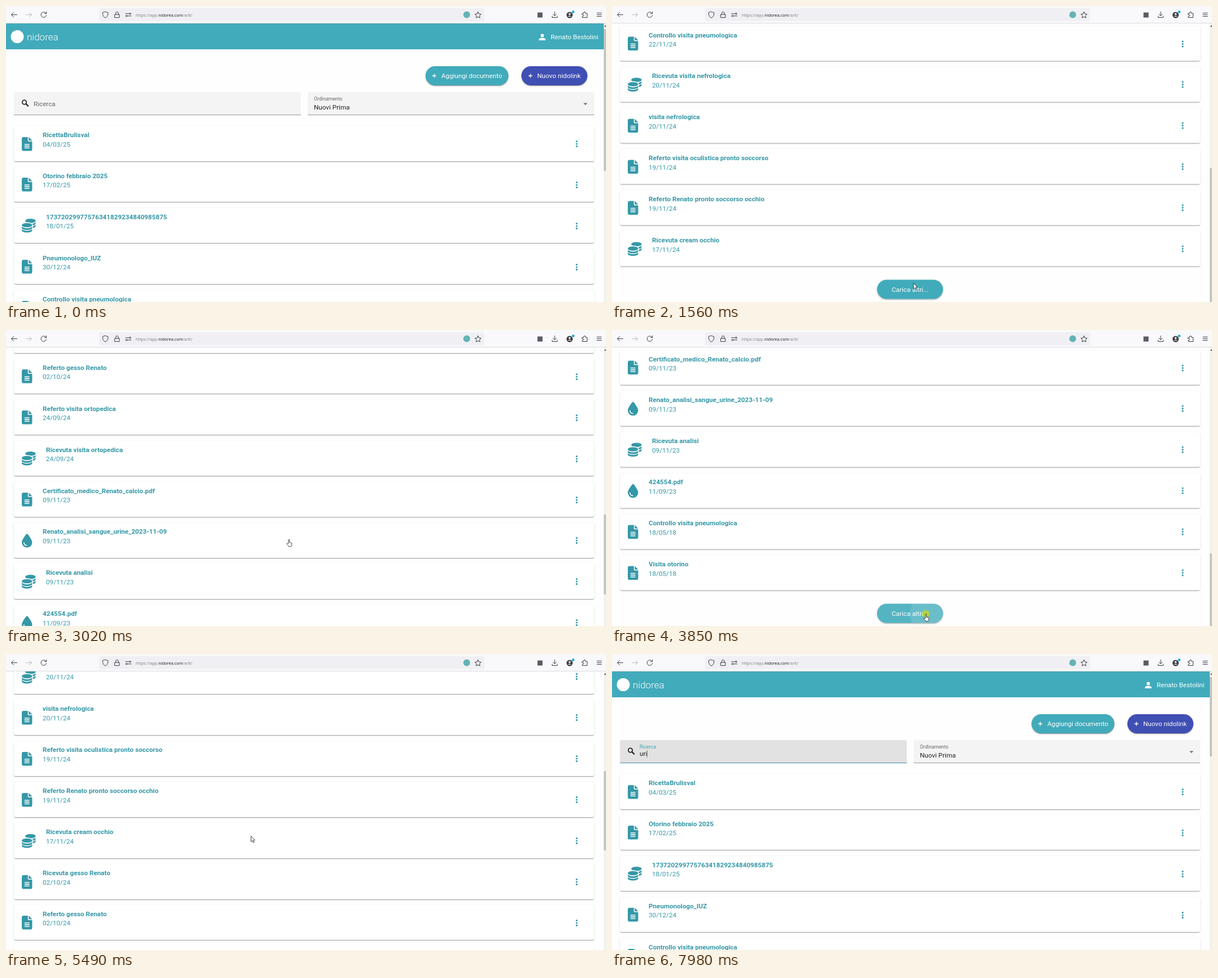
Animation, 1064 px wide and 526 px high, one loop 8000 ms. Source, as an HTML page:

```html
<!DOCTYPE html>
<html lang="it">
<head>
<meta charset="utf-8">
<title>Documenti</title>
<style>
html, body { margin: 0; width: 100%; height: 100%; overflow: hidden; background: #fefefe; }
body { position: relative; font: 11.7px/16px Roboto, sans-serif; color: #222; }
div, svg, span { position: absolute; }
span { white-space: pre; }
svg { overflow: visible; }
#page { left: 0; top: 0; width: 1060px; height: 526px; }
#head { left: 0; top: 30px; width: 1060px; height: 47px; background: #41abbb; }
.white { color: #fff; }
.brand { font-size: 17px; font-weight: 300; }
.small { font-size: 8.75px; }
.grey { color: #666; }
.card { left: 14px; width: 1029px; height: 62.3px; border-radius: 3px; background: #fff; color: #3598a7;
  box-shadow: 0 2px 1px -1px rgba(0,0,0,.2), 0 1px 1px rgba(0,0,0,.14), 0 1px 3px rgba(0,0,0,.12); }
.card svg { fill: #3598a7; }
.title { font-weight: 700; }
.pill { height: 34px; border-radius: 17px; background: #41abbb; overflow: hidden; }
.lift { height: 34px; border-radius: 17px;
  box-shadow: 0 2px 1px -1px rgba(0,0,0,.2), 0 1px 1.5px rgba(0,0,0,.18), 0 1px 4px rgba(0,0,0,.14); }
.field { top: 153px; width: 508.5px; height: 40px; background: #f4f4f4; border-radius: 3px 3px 0 0; border-bottom: 1px solid #959595; }
#focus { left: 14px; top: 193px; width: 508.5px; height: 1px; background: #3f8fa8; }
#label { transform-origin: 0 50%; }
#caret { width: 1px; height: 13px; top: 171px; background: #41abbb; }
#ripple { width: 2px; height: 2px; border-radius: 50%; background: #fff; }
#hover { inset: 0; background: #fff; }
#track { left: 1060px; top: 30px; width: 4px; height: 496px; background: #f1f1f1; }
#thumb { left: 1060px; width: 4px; background: #c3c4c5; }
#chrome { left: 0; top: 0; width: 1064px; height: 30px; background: #f9f9fb; border-bottom: 1px solid #dcdce0; }
.bar { left: 165px; top: 4px; width: 683px; height: 23px; border-radius: 3px; background: #f0f0f4; }
.url { font: 7.4px/16px "Open Sans", sans-serif; color: #7b7b82; }
.url b { font-weight: 400; color: #15141a; }
#dot { width: 13px; height: 13px; border-radius: 50%; background: rgba(184,212,48,.88); }
</style>
</head>
<body>
<div id="page"></div>
<div id="track"></div>
<div id="thumb"></div>
<div id="chrome">
  <div class="bar"></div>
  <svg width="1064" height="30" fill="none" stroke="#3c3c44" stroke-linecap="round" stroke-linejoin="round">
    <path d="M19.500 15.500H9.500M13.500 11.500l-4 4 4 4"/>
    <path stroke="#b9b9bf" d="M35.500 15.500H45.500M41.500 11.500l4 4-4 4"/>
    <path d="M71 13a4.800 4.800 0 1 0 .6 3.500M71.600 10.200v3.200h-3.200"/>
    <path d="M176.200 10.200l4.800 1.700c.3 4.500-1.300 7.600-4.800 9.300-3.500-1.700-5.100-4.800-4.800-9.300z"/>
    <path d="M193 15h8v5.500h-8zM194.700 15v-2.200a2.300 2.300 0 0 1 4.600 0V15"/>
    <path d="M212 13.700h6M213.500 17.700h8.500"/>
    <circle cx="220" cy="13.700" r="1.300"/><circle cx="213.500" cy="17.700" r="1.300" fill="#f0f0f4"/>
    <path d="M837 10.500l1.700 3.500 3.800.5-2.800 2.700.7 3.800-3.400-1.800-3.400 1.800.7-3.800-2.800-2.700 3.800-.5z"/>
    <path d="M973 10.500v6.500M970 14.500l3 3 3-3M968.500 18v2.500h9V18"/>
    <path d="M1022 13h2.500v-1a1.500 1.500 0 0 1 3 0v1h3v7.500h-8.500v-2.500h1.200a1.300 1.300 0 0 0 0-2.600H1022z"/>
    <path d="M1048 12.500h8M1048 15.500h8M1048 18.500h8"/>
    <g stroke="none">
      <circle cx="817" cy="15.500" r="6" fill="#63b3b5"/>
      <rect x="942.500" y="11.500" width="9" height="9" fill="#5b5b66"/>
      <circle cx="999.500" cy="16" r="5.500" fill="#3c3c44"/>
      <circle cx="999.500" cy="14.300" r="1.800" fill="#fff"/>
      <path d="M996.300 18.800a3.300 2 0 0 1 6.400 0z" fill="#fff"/>
      <circle cx="1005.800" cy="10.500" r="2.300" fill="#12a5d8"/>
    </g>
  </svg>
  <span class="url" style="left:230px;top:8px">https://app.<b>nidorea.com</b>/a/it/</span>
</div>
<svg width="4" height="4" style="left:1060px;top:33px"><path d="M0.500 4L3 1l2.500 3z" fill="#666"/></svg>
<div id="dot"></div>
<svg id="cursor" width="12" height="14" fill="#fff" stroke="#222" stroke-width=".85" stroke-linejoin="round">
  <path id="arrow" d="M0 0v10.200l2.300-2 1.700 3.500 1.500-.7-1.600-3.400 3.100-.3z"/>
  <path id="hand" d="M-1 7.500V1.200a1 1 0 0 1 2 0v4.300l3.200.7c.8.2 1.200.7 1.100 1.500l-.4 2.700c-.1.900-.5 1.700-.8 2.400H0C-.9 11.400-2.400 9.700-3.500 8.500c-.7-.9.5-1.800 1.300-1.100z"/>
  <path id="beam" fill="none" d="M-2-6q2 0 2 1.200 0-1.200 2-1.200M0-5V5M-2 6q2 0 2-1.200 0 1.200 2 1.200"/>
</svg>
<script>
const $ = id => document.getElementById(id);
const LOOP = 8000, STEP = 70.2, FIRST = 122, ROW = 72.9, TOP = 213.3;

// icon, title, date
const docs = [
  ['file', 'RicettaBrulisval', '04/03/25'],
  ['file', 'Otorino febbraio 2025', '17/02/25'],
  ['coins', '17372029977576341829234840985875', '18/01/25'],
  ['file', 'Pneumonologo_IUZ', '30/12/24'],
  ['file', 'Controllo visita pneumologica', '22/11/24'],
  ['coins', 'Ricevuta visita nefrologica', '20/11/24'],
  ['file', 'visita nefrologica', '20/11/24'],
  ['file', 'Referto visita oculistica pronto soccorso', '19/11/24'],
  ['file', 'Referto Renato pronto soccorso occhio', '19/11/24'],
  ['coins', 'Ricevuta cream occhio', '17/11/24'],
  ['file', 'Ricevuta gesso Renato', '02/10/24'],
  ['file', 'Referto gesso Renato', '02/10/24'],
  ['file', 'Referto visita ortopedica', '24/09/24'],
  ['coins', 'Ricevuta visita ortopedica', '24/09/24'],
  ['file', 'Certificato_medico_Renato_calcio.pdf', '09/11/23'],
  ['drop', 'Renato_analisi_sangue_urine_2023-11-09', '09/11/23'],
  ['coins', 'Ricevuta analisi', '09/11/23'],
  ['drop', '424554.pdf', '11/09/23'],
  ['file', 'Controllo visita pneumologica', '18/05/18'],
  ['file', 'Visita otorino', '18/05/18'],
  ['file', 'Visita allergologica', '11/04/18']
];

const band = 'M0 290c40 40 110 62 192 62s152-22 192-62v46c0 44-86 80-192 80S0 380 0 336z';
const icons = {
  file: `<path d="M64 0H224V128q0 32 32 32H384V448q0 64-64 64H64Q0 512 0 448V64Q0 0 64 0zM256 0L384 128H256z"/>
    <path d="M112 272H272M112 336H272M112 400H272" stroke="#fff" stroke-width="32" stroke-linecap="round"/>`,
  coins: `<ellipse cx="320" cy="80" rx="192" ry="80"/>
    <path d="${band}" transform="translate(128 -160)"/><path d="${band}" transform="translate(128 -64)"/>
    <path d="M0 240a192 80 0 0 1 384 0v192a192 80 0 0 1-384 0z" fill="#fff" stroke="#fff" stroke-width="56"/>
    <ellipse cx="192" cy="240" rx="192" ry="80"/><path d="${band}"/><path d="${band}" transform="translate(0 96)"/>`,
  drop: `<path d="M192 0C215 0 384 222 384 320a192 192 0 0 1-384 0C0 222 169 0 192 0z"/>
    <path d="M80 328q6 104 108 108" fill="none" stroke="#fff" stroke-width="32" stroke-linecap="round"/>`
};

const text = (x, y, str, cls = '', id = '') =>
  `<span id="${id}" class="${cls}" style="left:${x}px;top:${y - 8}px">${str}</span>`;
const box = (cls, x, y, w, extra = '') =>
  `<div class="${cls}" style="left:${x}px;top:${y}px;width:${w}px;${extra}"></div>`;
const plus = (x, y) => `<path d="M${x - 3.5} ${y}h7M${x} ${y - 3.5}v7" stroke="#fff" stroke-width="1.3"/>`;

function card([icon, title, date], i) {
  const x = icon === 'coins' ? 57 : 51;
  return `<div class="card" style="top:${TOP + ROW * i}px">
    <svg width="25" height="25" style="left:14px;top:19.300px"><g transform="scale(.048)">${icons[icon]}</g></svg>
    ${text(x, 15.7, title, 'title')}${text(x, 32.3, date)}
    <svg width="4" height="20" style="left:998px;top:31.700px">${[-4.4, 0, 4.4].map(y => `<circle cy="${y}" r="1.600"/>`).join('')}</svg>
  </div>`;
}

$('page').innerHTML = `
  <div id="head"></div>
  <svg width="1060" height="90" fill="#fff">
    <circle cx="20" cy="54.500" r="11.500"/>
    <circle cx="951" cy="52.500" r="2.900"/><path d="M945.200 61v-1.500c0-4 11.600-4 11.600 0V61z"/>
  </svg>
  ${text(37, 54.5, 'nidorea', 'white brand')}${text(966, 54.5, 'Renato Bestolini', 'white')}
  ${box('lift', 744, 107, 147, 'background:#41abbb')}${box('lift', 914, 107, 117, 'background:#3f4fb4')}
  ${text(772, 124, 'Aggiungi documento', 'white')}${text(942, 124, 'Nuovo nidolink', 'white')}
  <div class="field" id="search" style="left:14px"></div><div class="field" style="left:534.500px"></div>
  <div id="focus"></div>
  <svg width="1060" height="200" fill="none">
    ${plus(759.5, 124)}${plus(930, 124)}
    <circle cx="32.500" cy="171" r="3.700" stroke="#111" stroke-width="1.600"/>
    <path d="M35.200 173.700l4.600 4.600" stroke="#111" stroke-width="2"/>
    <path d="M1024 172.500h7l-3.500 3.500z" fill="#666"/>
  </svg>
  ${text(49, 174.2, 'Ricerca', 'grey', 'label')}${text(49, 177.4, '', '', 'typed')}<div id="caret"></div>
  ${text(546, 164.7, 'Ordinamento', 'small grey')}${text(546, 180, 'Nuovi Prima')}
  ${docs.map(card).join('')}
  <div id="more" class="lift" style="left:470px;width:117px">
    <div class="pill" style="width:117px"><div id="hover"></div><div id="ripple"></div>
    ${text(26, 17.2, 'Carica altri...', 'white')}</div>
  </div>`;

// keys are [step, values...]
const scrollKeys = [[-1, 0], [0, 18], [2, 110], [7, 400], [10, 469.5], [34, 469.5], [35, 495.5],
  [37, 620], [42, 1050], [45, 1198.5], [57, 1198.5], [58, 1170], [63, 880], [64, 870], [71, 870],
  [72, 835], [76, 569], [81, 110], [83, 0]];
const cursorKeys = [[0, 430, 254], [12, 430, 256], [20, 534.5, 492.5], [22, 538, 498], [25, 538, 498],
  [34, 473.5, 287.5], [36, 473.5, 288], [46, 530, 456], [51, 556.7, 504.7], [54, 556.7, 504.7], [64, 452, 310],
  [67, 452, 310], [71, 447, 326], [76, 434.5, 323.5], [83, 300, 252], [85, 253.7, 216.7], [90, 165, 177.5]];
const shapes = [[0, 'arrow'], [12, 'hand'], [19, 'arrow'], [21, 'hand'], [72, 'arrow'], [83, 'hand'], [88, 'beam']];
const typing = [[0, ''], [7580, 'u'], [7790, 'ur'], [7980, 'uri']];
const clicks = [23, 53, 90];
const bars = [[252, .526], [142, .2972], [141, .2935]];

const clamp = v => Math.max(0, Math.min(1, v));
const last = (keys, v) => keys.filter(k => k[0] <= v).pop() || keys[0];
const show = (el, on) => { el.style.display = on ? '' : 'none'; };

function mix(keys, n) {
  const a = last(keys, n), b = keys[keys.indexOf(a) + 1] || a;
  const p = a === b ? 0 : clamp((n - a[0]) / (b[0] - a[0]));
  return a.slice(1).map((v, i) => v + (b[i + 1] - v) * p);
}

const cards = [...document.querySelectorAll('.card')];

function draw(t) {
  const n = Math.max(-1, Math.floor((t - FIRST) / STEP));
  const [scroll] = mix(scrollKeys, n);
  const [x, y] = mix(cursorKeys, n);
  const batch = n < 27 ? 0 : n < 57 ? 1 : 2;
  const count = [10, 20, 21][batch];

  $('page').style.transform = `translateY(${-scroll}px)`;
  cards.forEach((c, i) => show(c, i < count));
  const moreTop = TOP + ROW * count + 13.7;
  show($('more'), batch < 2);
  $('more').style.top = moreTop + 'px';
  const [size, rate] = bars[batch];
  $('thumb').style.top = 41 + scroll * rate + 'px';
  $('thumb').style.height = size + 'px';

  const click = clicks.filter(c => c <= n).pop();
  const age = n - click;
  show($('dot'), age < 2);
  $('dot').style.transform = `translate(${x - 6.5}px,${y - 7}px)`;
  $('hover').style.opacity = batch < 2 && (n >= 49 || n >= 21 && n < 27) ? .1 : 0;
  const ripple = $('ripple').style;
  ripple.left = x - 471 + 'px';
  ripple.top = y - 1 + scroll - moreTop + 'px';
  ripple.transform = `scale(${29 + 35 * Math.min(age, 3) || 0})`;
  ripple.opacity = age < 4 ? .13 * (1 - clamp((age - 1) / 3)) : 0;

  const shape = last(shapes, n)[1];
  for (const id of ['arrow', 'hand', 'beam']) show($(id), id === shape);
  show($('cursor'), n >= 0 && t < 7580);
  $('cursor').style.transform = `translate(${x}px,${y}px)`;

  const p = clamp((n - 90) / 3);
  $('search').style.background = p > 0 ? '#e2e2e2' : n > 87 ? '#ececec' : '#f4f4f4';
  $('focus').style.transform = `scaleX(${p})`;
  $('label').style.transform = `translateY(${-9.5 * p}px) scale(${1 - .25 * p})`;
  $('label').style.color = p > 0 ? '#41a5b5' : '';
  const typed = last(typing, t)[1];
  $('typed').textContent = typed;
  $('caret').style.left = 49.3 + $('typed').offsetWidth + 'px';
  show($('caret'), p === 1 && (t < 7120 || t >= 7580));
}

const start = performance.now();
function tick() {
  draw((performance.now() - start) % LOOP);
  requestAnimationFrame(tick);
}
tick();
</script>
</body>
</html>
```
